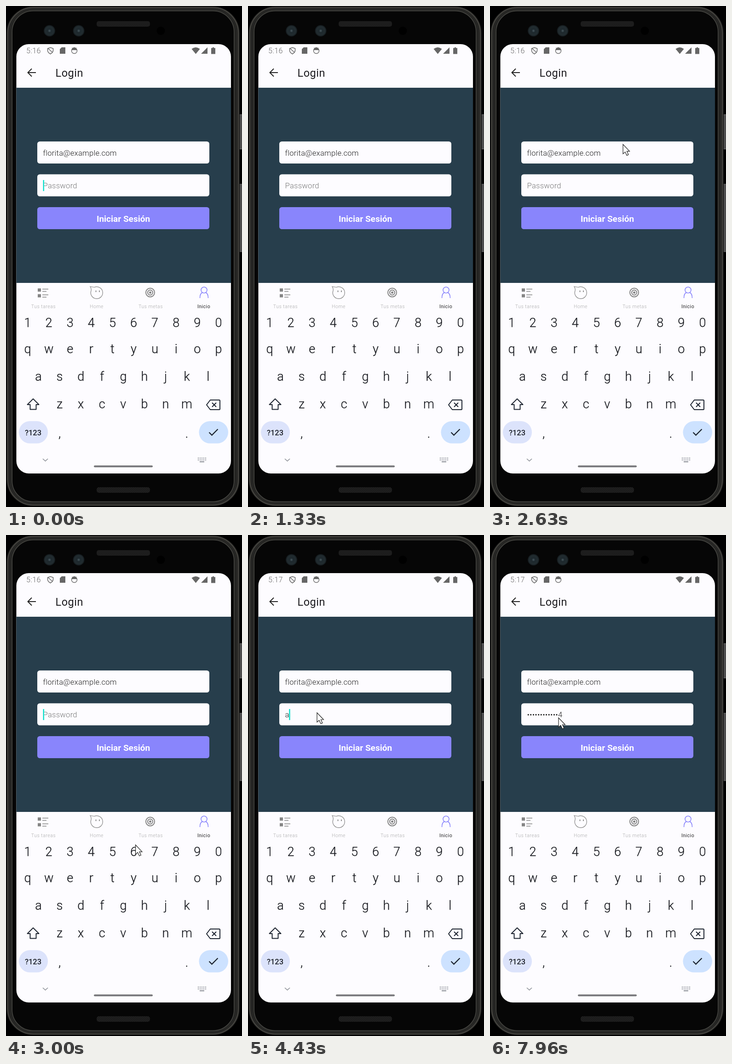
An HTML page that plays this animation: 513x1091 px, repeating every 8000 ms.

```html
<!DOCTYPE html>
<html lang="es">
<head>
<meta charset="utf-8">
<style>
html, body { margin: 0; width: 100%; height: 100%; overflow: hidden; background: #000; }
svg { display: block; width: 513px; height: 1091px; font-family: Roboto, sans-serif; }
.line { fill: none; stroke-width: 2; }
.field { font-size: 16.6px; font-weight: 300; letter-spacing: .25px; fill: #222; }
.tab { font-size: 10.5px; font-weight: 300; letter-spacing: .5px; text-anchor: middle; fill: #aaa; }
.key { font-size: 27px; font-weight: 300; text-anchor: middle; fill: #15171c; stroke: #15171c; stroke-width: .25; }
</style>
</head>
<body>
<svg viewBox="0 0 513 1091">
  <defs>
    <radialGradient id="lens">
      <stop offset="0" stop-color="#4a5a60"/>
      <stop offset=".3" stop-color="#1d282d"/>
      <stop offset=".75" stop-color="#222c30"/>
      <stop offset="1" stop-color="#11171a"/>
    </radialGradient>
    <pattern id="mesh" width="4" height="4" patternUnits="userSpaceOnUse">
      <rect width="4" height="4" fill="#181818"/>
      <path d="M0 0h2v2H0zM2 2h2v2H2z" fill="#222"/>
    </pattern>
    <clipPath id="screen"><rect x="22.5" y="83" width="466.5" height="935" rx="27"/></clipPath>
  </defs>

  <!-- phone body -->
  <g fill="#4d4d4d" stroke="#777" stroke-width="1">
    <rect x="507" y="236.5" width="8" height="75" rx="2"/>
    <rect x="507" y="388" width="8" height="147" rx="2"/>
  </g>
  <rect x="1" y="1" width="507" height="1088" rx="58" fill="#191918"/>
  <rect x="4" y="3.5" width="501" height="1083" rx="55" fill="none" stroke="#45443f" stroke-width="2.5"/>
  <rect x="8.5" y="7" width="492" height="1076" rx="50" fill="none" stroke="#262624" stroke-width="5"/>
  <rect x="13" y="10.5" width="483" height="1069" rx="46" fill="#060606" stroke="#41413d" stroke-width="2"/>
  <rect x="197" y="33" width="116" height="12" rx="5" fill="url(#mesh)"/>
  <rect x="197" y="1048" width="116" height="12" rx="5" fill="url(#mesh)"/>
  <circle cx="94.5" cy="54" r="12.5" fill="url(#lens)"/>
  <circle cx="158" cy="54" r="12.5" fill="url(#lens)"/>
  <circle cx="336.5" cy="54" r="9" fill="#000"/>

  <g clip-path="url(#screen)">
    <rect x="22" y="83" width="468" height="936" fill="#fdfcff"/>
    <rect x="22" y="178" width="468" height="425" fill="#273e4c"/>
  </g>

  <!-- status bar -->
  <text id="clock" x="44" y="103" font-size="16.2" font-weight="300" letter-spacing=".4" fill="#666"></text>
  <g fill="#666">
    <path d="M96.500 90.500l6 2v4q0 5-6 8q-6-3-6-8v-4zM92 93l9 8" fill="none" stroke="#666" stroke-width="1.5"/>
    <path d="M121 90h8v14h-12v-10z"/>
    <circle cx="148.500" cy="97.500" r="6" fill="none" stroke="#666" stroke-width="1.4"/>
    <path d="M142.500 96a6 6 0 0 1 12 0zM143 90l3 3h-2zM154 90l-3 3h2z"/>
    <path d="M403.500 93.500q9-7 18 0L412.500 104.500zM438 90v14h-14zM449 90h3v1.500h3v13h-9v-13h3z"/>
  </g>

  <!-- app bar -->
  <path d="M65 145H48M56 136.500l-8.500 8.500 8.500 8.500" class="line" stroke="#222"/>
  <text x="107.500" y="154" font-size="23.500" letter-spacing=".5" fill="#1c1b1f">Login</text>

  <!-- form -->
  <g fill="#fdfcff">
    <rect x="68" y="295" width="374" height="48" rx="5.500"/>
    <rect x="68" y="366.500" width="374" height="48" rx="5.500"/>
    <rect x="68" y="438" width="374" height="48" rx="5.500" fill="#8985fc"/>
    <text x="255" y="470" font-size="19" font-weight="700" text-anchor="middle" fill="#fff">Iniciar Sesión</text>
  </g>
  <text class="field" x="80.500" y="326">florita@example.com</text>
  <text id="pass" class="field" x="80.500" y="397"></text>
  <rect id="caret" y="379" width="2.500" height="24" fill="#10e0cc"/>

  <!-- tab bar -->
  <g fill="#858585">
    <path d="M69 615h7v7h-7zM69 627.500h7v7h-7z"/>
    <path d="M79 616.500h13M79 621.500h9M79 629h13M79 634h9" stroke="#858585" stroke-width="1.500"/>
    <path d="M183 611l9 1.500A13 13 0 1 1 185 620Q186 616 183 611z" class="line" style="stroke-width:1.200" stroke="#858585"/>
    <path d="M195.500 619.500v3.500M203 619.500v3.500" stroke="#777" stroke-width="1.600"/>
    <circle cx="313.500" cy="624" r="9.500" class="line" stroke="#858585"/>
    <circle cx="313.500" cy="624" r="5.500" class="line" stroke="#858585"/>
    <circle cx="313.500" cy="624" r="2.500"/>
  </g>
  <g fill="none" stroke="#8985fc" stroke-width="1.600">
    <circle cx="430.500" cy="618.500" r="6.500"/>
    <path d="M421.500 636q0-10 5.500-12M439.500 636q0-10-5.500-12"/>
  </g>
  <text class="tab" x="81.500" y="657.500">Tus tareas</text>
  <text class="tab" x="197" y="657.500">Home</text>
  <text class="tab" x="314.500" y="657.500">Tus metas</text>
  <text class="tab" x="430" y="657.500" style="fill:#222;font-weight:400">Inicio</text>

  <!-- keyboard -->
  <g id="keys"></g>
  <g class="line" stroke="#1d2430" stroke-linejoin="round">
    <path d="M59 855.500L71.500 868H65.500V878.500H52.500V868H46.500z"/>
    <path d="M444 858h19.500q1.500 0 1.500 1.500v18q0 1.500-1.500 1.500H444l-8-10.500zM448 864l9 9M457 864l-9 9"/>
  </g>
  <rect x="28" y="904" width="63" height="48.500" rx="24.250" fill="#dce3fb"/>
  <text x="59" y="935" font-size="16.500" font-weight="500" text-anchor="middle" fill="#20242c">?123</text>
  <rect x="419.500" y="904" width="63.500" height="48.500" rx="24.250" fill="#cde2ff"/>
  <path d="M441.500 928.500l6 6 13-13" class="line" style="stroke-width:2.300" stroke="#1d2430"/>
  <path d="M80 986l5.500 5 5.500-5" class="line" style="stroke-width:1.500" stroke="#888c94"/>
  <rect x="191" y="1000.500" width="128" height="4" rx="2" fill="#77777a"/>
  <path d="M417 984.500h18M417 988.500h18" class="line" stroke="#83868e" stroke-dasharray="2 2"/>
  <path d="M421 992.500h10" class="line" stroke="#83868e"/>

  <path id="pointer" d="M0 0V20.500L4.700 16.500 8.300 24 11.800 22.400 8.400 15H14.300z" fill="#fff" stroke="#222" stroke-width="1.200"/>
</svg>
<script>
const LOOP = 8000;
const $ = id => document.getElementById(id);
const [clock, pass, caret, pointer] = ['clock', 'pass', 'caret', 'pointer'].map($);

// row of keys: characters, first centre, baseline
const rows = [
  ['1234567890', 47, 699], ['qwertyuiop', 47, 756],
  ['asdfghjkl', 70.5, 816], ['zxcvbnm', 116.5, 876],
  [',', 116.5, 940], ['.', 393, 940]
];
$('keys').innerHTML = rows.map(([chars, x, y]) => [...chars].map((c, i) =>
  `<text class="key" x="${x + i * 46.1}" y="${y}">${c}</text>`).join('')).join('');

const secret = 'aguaclaro1234';
const typed = [4430, 4800, 4960, 5160, 5360, 5460, 5600, 5730, 5860, 6630, 6800, 6960, 7160];

// pointer path: time, x, y
const path = [
  [1830, 40, 300], [2030, 240, 275], [2160, 286, 258], [2460, 289, 290], [2630, 289, 300],
  [2860, 310, 610], [3000, 281, 675], [3160, 374, 640], [3430, 153, 390], [3600, 150, 387],
  [7900, 150, 387], [7960, 149, 398]
];

function pointerAt(t) {
  const i = path.findIndex(p => p[0] > t);
  if (i < 0) return path.at(-1).slice(1);
  const [a, b] = [path[i - 1], path[i]];
  const k = (t - a[0]) / (b[0] - a[0]);
  return [1, 2].map(n => a[n] + (b[n] - a[n]) * k);
}

function draw(t) {
  clock.textContent = t < 3530 ? '5:16' : '5:17';

  const count = typed.filter(s => s <= t).length;
  pass.textContent = count ? '•'.repeat(count - 1) + secret[count - 1] : 'Password';
  pass.style.fill = count ? '#222' : '#777';
  const blinkStart = count ? typed[count - 1] : -170;
  caret.setAttribute('x', count ? 80 + pass.getComputedTextLength() : 80.5);
  caret.style.visibility = (t - blinkStart) % 1000 < 500 ? 'visible' : 'hidden';

  const shown = t >= path[0][0];
  pointer.style.visibility = shown ? 'visible' : 'hidden';
  if (shown) pointer.setAttribute('transform', `translate(${pointerAt(t)})`);
}

const start = performance.now();
(function frame() {
  draw((performance.now() - start) % LOOP);
  requestAnimationFrame(frame);
})();
</script>
</body>
</html>
```
